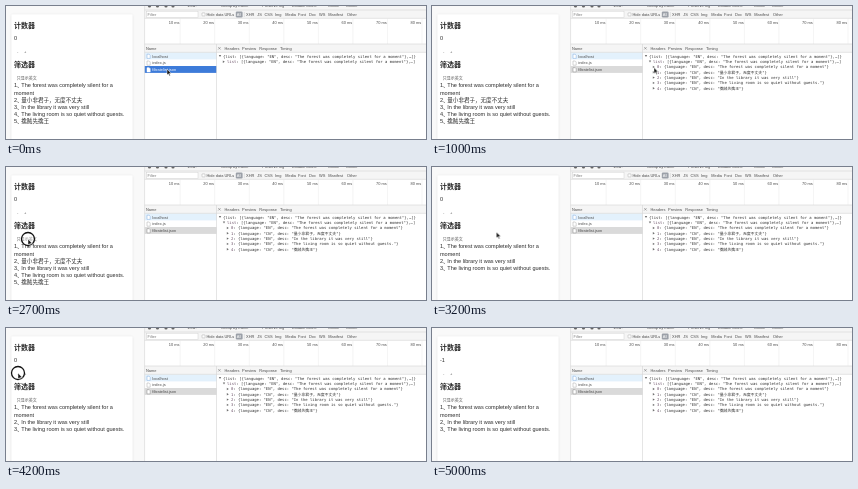
Write an HTML page that moves like this. It is 420x133 px and loops after 5.3 s.

```html
<!DOCTYPE html>
<html lang="zh-CN">
<head>
<meta charset="utf-8">
<title>Counter and filter demo</title>
<style>
  html, body { margin: 0; width: 100%; height: 100%; overflow: hidden; background: #fff; }
  svg { display: block; width: 100%; height: 100%; }
  text { white-space: pre; }

  .page { font-family: "Liberation Sans", "Noto Sans CJK SC", "Noto Sans CJK", sans-serif; font-size: 5.55px; fill: #2b2b2b; }
  .title { font-size: 7px; font-weight: 700; }
  .label { font-size: 4px; fill: #555; }
  .ui { font-family: "Liberation Sans", Arial, sans-serif; font-size: 3.95px; fill: #484848; }
  .tree { font-family: "DejaVu Sans Mono", "Noto Sans CJK SC", "Noto Sans CJK", monospace; font-size: 3.87px; fill: #333; }
  .key { fill: #6b5068; }
  .rule { stroke: #d4d4d4; stroke-width: .6; }

  .anim { animation: 5.3s step-end infinite; }
  .open { animation-name: open; }
  .closed { animation-name: closed; }
  .all { animation-name: all; }
  .english { animation-name: english; }
  .zero { animation-name: zero; }
  .minus { animation-name: minus; }
  .ring { animation-name: ring; fill: #fff; fill-opacity: .35; stroke: #111; stroke-width: 1.3; }
  #cursor { animation: move 5.3s infinite; }
  .arrow { animation-name: arrow; }

  @keyframes open { 0% { visibility: hidden } 15.094%, 100% { visibility: visible } }
  @keyframes closed { 0% { visibility: visible } 15.094%, 100% { visibility: hidden } }
  @keyframes all { 0% { visibility: visible } 52.83%, 100% { visibility: hidden } }
  @keyframes english { 0% { visibility: hidden } 52.83%, 100% { visibility: visible } }
  @keyframes zero { 0% { visibility: visible } 81.132%, 100% { visibility: hidden } }
  @keyframes minus { 0% { visibility: hidden } 81.132%, 100% { visibility: visible } }
  @keyframes ring {
    0%, 16.981%, 54.717%, 83.019%, 100% { visibility: hidden; r: 6.5px }
    13.208%, 49.057%, 77.358% { visibility: visible; r: 7.6px }
    15.094%, 50.943%, 79.245% { visibility: visible; r: 6.5px }
  }
  @keyframes arrow { 0% { visibility: visible } 94.34%, 100% { visibility: hidden } }
  @keyframes move {
    0% { transform: translate(161px, 63px); animation-timing-function: step-end }
    1.887% { transform: translate(161px, 63px); animation-timing-function: steps(5) }
    11.321% { transform: translate(222px, 58px); animation-timing-function: step-end }
    16.981% { transform: translate(222px, 61.5px); animation-timing-function: step-end }
    20.755% { transform: translate(222px, 61.5px); animation-timing-function: steps(6) }
    32.075% { transform: translate(64px, 99px); animation-timing-function: steps(2) }
    35.849% { transform: translate(59px, 102px); animation-timing-function: steps(5) }
    47.17% { transform: translate(22px, 72px); animation-timing-function: step-end }
    56.604% { transform: translate(22px, 72px); animation-timing-function: steps(5) }
    66.038% { transform: translate(128px, 54.5px); animation-timing-function: step-end }
    67.925% { transform: translate(128px, 54.5px); animation-timing-function: steps(5) }
    77.358% { transform: translate(12px, 45px); animation-timing-function: step-end }
    84.906% { transform: translate(12px, 45px); animation-timing-function: steps(3) }
    90.566%, 100% { transform: translate(17px, 44px); animation-timing-function: step-end }
  }
</style>
</head>
<body>
<svg viewBox="0 0 420 133">
  <defs>
    <filter id="shadow" x="-10%" y="-10%" width="120%" height="120%">
      <feDropShadow dx="0" dy=".5" stdDeviation="1.2" flood-opacity=".12"/>
    </filter>
  </defs>

  <g class="page">
    <rect width="139" height="133" fill="#f9f9f9"/>
    <rect x="5.6" y="8.5" width="120.8" height="140" rx="1" fill="#fff" filter="url(#shadow)"/>
    <text class="title" x="8" y="21.5">计数器</text>
    <text class="anim zero" x="8" y="34.3">0</text>
    <text class="anim minus" x="8" y="34.3">-1</text>
    <text class="label" x="11" y="46.5">-</text>
    <text class="label" x="18" y="46.5">+</text>
    <text class="title" x="8" y="60.7">筛选器</text>
    <text class="label" x="10.7" y="73.8">只显示英文</text>
    <g id="all" class="anim all"></g>
    <g id="english" class="anim english"></g>
  </g>

  <g class="ui">
    <rect x="138.6" width="282" height="133" fill="#fff"/>
    <rect x="138.6" width="282" height="12.3" fill="#f5f5f5"/>
    <g id="toolbar"></g>
    <path class="rule" d="M138.6 4H420M138.6 12.3H420"/>
    <rect x="140.5" y="5.2" width="51.5" height="6.4" fill="#fff" stroke="#d0d0d0" stroke-width=".5"/>
    <text x="141.6" y="9.9" fill="#777">Filter</text>
    <rect x="196" y="6.9" width="3" height="3" rx=".5" fill="#fff" stroke="#999" stroke-width=".4"/>
    <text x="200.5" y="9.9">Hide data URLs</text>
    <rect x="229.8" y="5.6" width="6.8" height="5.8" rx="1.2" fill="#9ba0a8"/>
    <text x="230.8" y="9.9" fill="#fff">All</text>
    <path class="rule" d="M238.3 6V11"/>
    <g id="types"></g>
    <g id="timeline"></g>

    <rect x="138.6" y="38" width="282" height="8.3" fill="#f5f5f5"/>
    <text x="140" y="43.8">Name</text>
    <path d="M212.2 41.1l2.4 2.4m0-2.4l-2.4 2.4" stroke="#666" stroke-width=".5"/>
    <g id="tabs"></g>
    <rect x="138.6" y="46.5" width="72" height="6.9" fill="#e3f1fc"/>
    <rect class="anim closed" x="138.6" y="60" width="72" height="6.9" fill="#3d7bd9"/>
    <rect class="anim open" x="138.6" y="60" width="72" height="6.9" fill="#dadada"/>
    <g id="files"></g>
    <path class="rule" d="M138.6 38H420M138.6 46.3H420M138.6 0V133M210.5 38V133"/>
  </g>

  <g class="tree">
    <g id="root"></g>
    <g id="closed" class="anim closed"></g>
    <g id="open" class="anim open"></g>
  </g>

  <g id="cursor">
    <circle class="anim ring" r="6.5"/>
    <path class="anim arrow" d="M0 0V6L1.4 4.8L2.4 7L3.3 6.6L2.4 4.5H4.2Z" fill="#111" stroke="#fff" stroke-width=".5"/>
  </g>
</svg>
<script>
  const NS = "http://www.w3.org/2000/svg";
  const $ = id => document.getElementById(id);

  function add(parent, tag, attrs, content = "") {
    const node = document.createElementNS(NS, tag);
    for (const name in attrs) node.setAttribute(name, attrs[name]);
    node.textContent = content;
    parent.appendChild(node);
    return node;
  }
  const label = (parent, x, y, content, attrs) => add(parent, "text", { x, y, ...attrs }, content);

  const FOREST = "The forest was completely silent for a moment";
  const items = [
    ["EN", FOREST],
    ["CN", "量小非君子，无度不丈夫"],
    ["EN", "In the library it was very still"],
    ["EN", "The living room is so quiet without guests."],
    ["CN", "擒贼先擒王"]
  ];

  function drawList(group, rows) {
    let y = 81.4;
    rows.forEach(([, desc], i) => {
      label(group, 8, y, i + 1 + "、");
      const wraps = desc === FOREST;
      label(group, 15.3, y, wraps ? desc.replace(" moment", "") : desc);
      if (wraps) label(group, 8, y += 7.1, "moment");
      y += 7.1;
    });
  }
  drawList($("all"), items);
  drawList($("english"), items.filter(([lang]) => lang === "EN"));

  // Toolbar row, cut off by the top edge
  [[181, "View:"], [215, "Group by frame"], [256, "Preserve log"], [286, "Disable cache"], [322, "Offline"], [340, "Online"]]
    .forEach(([x, name]) => label($("toolbar"), x, 1, name));
  [143.5, 151.5, 160, 167].forEach(cx =>
    add($("toolbar"), "circle", { cx, cy: 0, r: 1.6, fill: "#666" }));

  [[240, "XHR"], [251.2, "JS"], [258.5, "CSS"], [269, "Img"], [279.2, "Media"], [292, "Font"],
   [303, "Doc"], [313, "WS"], [322.2, "Manifest"], [341, "Other"]]
    .forEach(([x, name]) => label($("types"), x, 9.9, name));

  for (let i = 1; i <= 8; i++) {
    const x = 139.6 + 34.55 * i;
    add($("timeline"), "path", { d: `M${x} 12.5V38`, stroke: "#e8e8e8", "stroke-width": .5 });
    label($("timeline"), x - .7, 17.7, `${i}0 ms`, { "text-anchor": "end" });
  }

  [[218.5, "Headers"], [236, "Preview"], [253.3, "Response"], [274, "Timing"]]
    .forEach(([x, name]) => label($("tabs"), x, 43.8, name));

  function drawFile(y, name, icon, attrs = {}) {
    const row = add($("files"), "g", attrs);
    add(row, "path", { d: `M141 ${y - 3.4}h2.2l1 1v3.2h-3.2z`, fill: "#fff", stroke: icon, "stroke-width": .5 });
    label(row, 146.3, y, name);
  }
  drawFile(51.6, "localhost", "#7fabdf");
  drawFile(58.4, "index.js", "#aaa");
  drawFile(65.1, "filtratelist.json", "#fff", { class: "anim closed", fill: "#fff" });
  drawFile(65.1, "filtratelist.json", "#888", { class: "anim open" });

  function drawNode(group, x, y, key, value, expanded) {
    const shape = expanded ? "h2.4l-1.2 2z" : "v2.4l2-1.2z";
    add(group, "path", { d: `M${x - 4.2} ${y - 2.5}${shape}`, fill: "#6e6e6e" });
    const line = label(group, x, y, "");
    if (key) add(line, "tspan", { class: "key" }, key);
    add(line, "tspan", {}, (key ? ": " : "") + value);
  }
  const record = ([lang, desc]) => `{language: "${lang}", desc: "${desc}"}`;
  const preview = `[${record(items[0])},…]`;
  drawNode($("root"), 217, 51.5, "", `{list: ${preview}}`, true);
  drawNode($("closed"), 221, 57, "list", preview, false);
  drawNode($("open"), 221, 57, "list", preview, true);
  items.forEach((item, i) => drawNode($("open"), 225, 62.3 + 5.3 * i, String(i), record(item), false));
</script>
</body>
</html>
```
